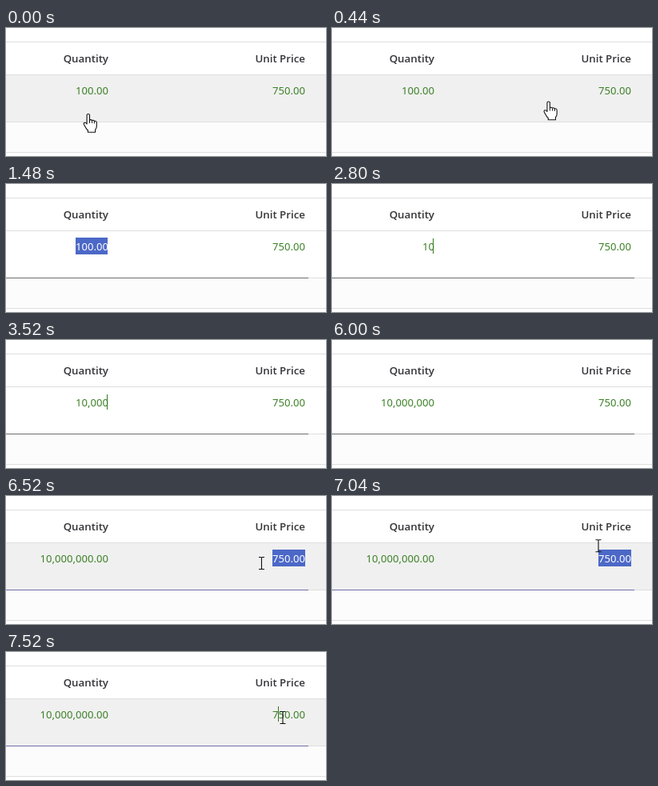
Recreate the animation shown at these times as an HTML page. Size 400 by 160 pixels, loop 8 s.

```html
<!DOCTYPE html>
<html lang="en">
<head>
<meta charset="utf-8">
<title>Editing a quantity</title>
<style>
  html, body { margin: 0; width: 100%; height: 100%; overflow: hidden; background: #fff; }
  svg { display: block; width: 400px; height: 160px; }
  text { text-anchor: end; }
  .head { font: 600 13.3px "Open Sans", "Noto Sans", sans-serif; fill: #343438; }
  .value { font: 13.1px "Noto Sans", "Open Sans", sans-serif; fill: #3b8026; }
  .selected { fill: #fff; }
  .rule { fill: #dedede; }
</style>
</head>
<body>
<svg viewBox="0 0 400 160" xmlns="http://www.w3.org/2000/svg">
  <rect width="400" height="160" fill="#fff"/>
  <rect id="row" y="59" width="400" height="58" fill="#f0f0f0"/>
  <rect y="118" width="400" height="37" fill="#fcfcfc"/>
  <rect class="rule" y="17" width="400" height="1"/>
  <rect class="rule" y="58" width="400" height="1"/>
  <rect class="rule" y="117" width="400" height="1"/>
  <rect class="rule" y="155" width="400" height="1"/>
  <rect id="editLine" y="117" width="378" height="1"/>
  <text class="head" x="128" y="43">Quantity</text>
  <text class="head" x="374" y="43">Unit Price</text>
  <rect id="quantityMark" x="87" y="67" width="40" height="21" fill="#4c68c7"/>
  <rect id="priceMark" x="333" y="67" width="41" height="21" fill="#4c68c7"/>
  <text id="quantity" class="value" x="128" y="83"></text>
  <text id="price" class="value" x="374" y="83">750.00</text>
  <rect id="caret" y="68" width="1" height="19" fill="#2f7a1c"/>
  <g id="hand">
    <path d="M-1.9 13V1.8Q-1.9 0.5 -.2 .5T1.5 1.8V8.2Q3.2 7 4.6 8.6Q6.3 7.7 7.4 9.4Q10.3 8.8 10.3 11.6V16Q10.3 18.2 8.6 20.2V23.2H-.6V21Q-2.4 19.4 -3.4 17.4L-5.6 13.5Q-6.2 11.5 -4.5 11.3Q-3.2 11.2 -1.9 13Z"
      fill="#fff" stroke="#111" stroke-width="1.1" stroke-linejoin="round"/>
    <path d="M1.5 8V12M4.6 8.8V12M7.4 9.5V12.4" fill="none" stroke="#111"/>
  </g>
  <path id="beam" d="M-3.5 -7.5H-1Q0 -7.5 0 -6.5Q0 -7.5 1 -7.5H3.5M0 -7V7M-3.5 7.5H-1Q0 7.5 0 6.5Q0 7.5 1 7.5H3.5"
    fill="none" stroke="#111" stroke-width="1.1"/>
</svg>
<script>
const LOOP = 8000;
const PRICE_CLICK = 720, QUANTITY_FOCUS = 1440, TYPING = 2080;
const CARET_OFF = 5120, PRICE_AGAIN = 6400, PRICE_CARET = 7520;

const typed = [
  [0, "100.00"], [TYPING, "1"], [2800, "10"], [3000, "100"], [3240, "1,000"],
  [3520, "10,000"], [4040, "100,000"], [4320, "1,000,000"],
  [5080, "10,000,000"], [PRICE_AGAIN, "10,000,000.00"]
];

// Pointer stops: time, x, y
const firstMove = [[0, 103, 107], [760, 374, 82]];
const secondMove = [
  [6040, 362, 119], [6360, 324, 85], [6520, 319.5, 84], [6600, 297, 86], [6800, 297, 86],
  [6960, 316, 61], [7140, 356, 64], [7320, 346, 82]
];

const el = id => document.getElementById(id);
const [row, editLine, quantity, price, quantityMark, priceMark, caret, hand, beam] =
  ["row", "editLine", "quantity", "price", "quantityMark", "priceMark", "caret", "hand", "beam"].map(el);

const show = (node, on) => node.setAttribute("display", on ? "inline" : "none");
const between = (t, from, to) => t >= from && t < to;
const ease = u => u * u * (3 - 2 * u);

function along(stops, t) {
  const next = stops.findIndex(stop => stop[0] > t);
  if (next < 0) return stops[stops.length - 1].slice(1);
  if (next === 0) return stops[0].slice(1);
  const [t0, x0, y0] = stops[next - 1];
  const [t1, x1, y1] = stops[next];
  const u = ease((t - t0) / (t1 - t0));
  return [x0 + (x1 - x0) * u, y0 + (y1 - y0) * u];
}

function pointerAt(t) {
  if (t < QUANTITY_FOCUS) return along(firstMove, t);
  return t >= secondMove[0][0] ? along(secondMove, t) : null;
}

function render(t) {
  const pointer = pointerAt(t);
  const hovered = pointer !== null && pointer[1] < 117;
  const editing = t >= PRICE_CLICK;
  const quantitySelected = between(t, QUANTITY_FOCUS, TYPING);
  const priceSelected = between(t, PRICE_CLICK, QUANTITY_FOCUS) || between(t, PRICE_AGAIN, PRICE_CARET);
  const usesBeam = editing && hovered;

  show(row, hovered);
  show(editLine, editing);
  editLine.setAttribute("fill", hovered ? "#7070ac" : "#6c706c");

  quantity.textContent = typed.filter(step => step[0] <= t).pop()[1];
  quantity.classList.toggle("selected", quantitySelected);
  price.classList.toggle("selected", priceSelected);
  show(quantityMark, quantitySelected);
  show(priceMark, priceSelected);

  show(caret, between(t, TYPING, CARET_OFF) || t >= PRICE_CARET);
  caret.setAttribute("x", t >= PRICE_CARET ? 340 : 126);

  show(hand, pointer && !usesBeam);
  show(beam, pointer && usesBeam);
  if (pointer) (usesBeam ? beam : hand).setAttribute("transform", `translate(${pointer})`);
}

function tick() {
  render(performance.now() % LOOP);
  requestAnimationFrame(tick);
}
tick();
</script>
</body>
</html>
```
